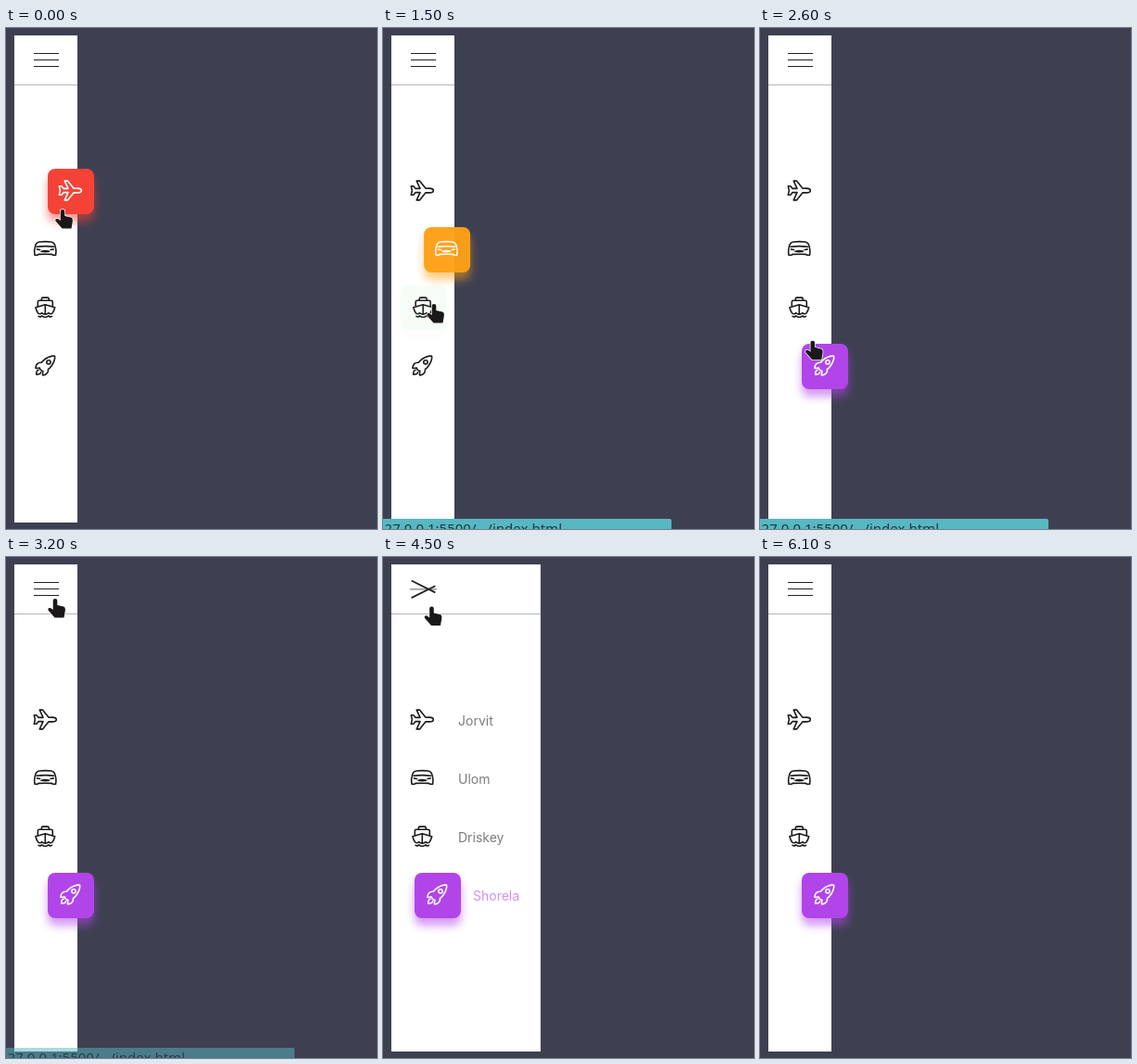
Write an HTML page that moves like this. It is 400 by 541 pixels and loops after 6200 ms.

```html
<!DOCTYPE html>
<html lang="en">
<head>
<meta charset="utf-8">
<title>Sidebar menu</title>
<style>
  html, body { margin: 0; height: 100%; overflow: hidden; background: #3e4052; }
  svg { display: block; width: 100%; height: 100%; }
  .icon { fill: none; stroke-width: 32; stroke-linejoin: round; stroke-linecap: round; }
  .glow { filter: blur(5px); opacity: .55; }
  .label { font: 14px Inter, sans-serif; }
  .status text { font: 15px "Noto Sans", sans-serif; fill: #1d3a42; }
</style>
</head>
<body>
<svg viewBox="0 0 400 541" preserveAspectRatio="none">
  <rect id="panel" x="9" y="8" width="68" height="526" fill="#fff"/>
  <rect id="rule" x="9" y="61" width="68" height="1" fill="#b4b7b8"/>
  <g id="burger" stroke="#222"><path/><path/><path/></g>
  <g id="items"></g>
  <g id="status" class="status">
    <path d="M0 530H309Q311 530 311 532V541H0Z" fill="#57b8c1"/>
    <text x="193" y="546" text-anchor="end">127.0.0.1:5500/…/index.html</text>
  </g>
  <path id="cursor" fill="#1b1819" stroke="#fff" stroke-width="1.4" stroke-linejoin="round" paint-order="stroke"
    d="M-2.3 2Q-2.3 0 0 0T2.3 2V7L9 8.6Q11.3 9.5 10.8 13L9.5 20.5H-.5L-7.5 12.5Q-8.5 9.5 -5 10L-2.3 12Z"/>
</svg>
<script>
const LOOP = 6200, STEP = 100, DURATION = 500;
const $ = id => document.getElementById(id);

const ITEMS = [
  { label: 'Jorvit', color: '#f44336', start: -DURATION, icon:
    `<path d="M408 208L331 210L198 48H135L210 213L113 214L68 160H16L37 254V258L16 352H68L113 297
      L210 299L135 464H198L331 302L408 304C465 304 496 286 496 256C496 226 463 208 408 208Z"/>` },
  { label: 'Ulom', color: '#ffa117', start: 675, icon:
    `<path d="M32 234Q48 118 128 106Q256 92 384 106Q464 118 480 234Q494 300 488 340L480 392H424L400 374
      Q256 366 112 374L88 392H32L24 340Q18 300 32 234ZM72 210Q256 188 440 210M80 264L140 276M432 264L372 276"/>
     <path fill="currentColor" d="M172 312Q256 286 340 312Q256 330 172 312Z"/>` },
  { label: 'Driskey', color: '#0fc70f', start: 1475, icon:
    `<path d="M48 260L256 200L464 260Q440 350 408 388Q360 416 332 380Q256 440 180 380Q152 416 104 388
      Q72 350 48 260ZM256 200V400M96 240V144Q96 112 128 112H384Q416 112 416 144V240
      M176 112V80Q176 48 208 48H304Q336 48 336 80V112M112 452Q150 480 184 444Q256 500 328 444Q362 480 400 452"/>` },
  { label: 'Shorela', color: '#b145e9', start: 2250, duration: 150, icon:
    `<path d="M460 52C400 38 276 86 210 153Q190 172 177 192C100 186 60 220 48 304Q50 316 58 315L139 306
      Q140 330 146 336L177 367Q184 374 207 374L198 455Q200 466 208 465C292 452 326 412 320 336
      Q342 320 360 303C428 234 476 112 462 54ZM110 352Q64 360 64 448Q152 448 160 402"/>
     <circle cx="329" cy="183" r="43"/>` },
];

// Cursor tip: [time, x, y]
const CURSOR = [
  [100, 61, 196], [300, 60, 236], [850, 60, 236], [1200, 57, 299], [1300, 57, 299], [1400, 55, 298],
  [1700, 55, 298], [2100, 57, 355], [2500, 57, 355], [3200, 53, 45], [4400, 53, 45],
  [5000, 46, 159], [5100, 46, 159], [5650, 66, 3],
];

const clamp = v => Math.min(1, Math.max(0, v));
const lerp = (a, b, k) => a + (b - a) * k;
const ramp = (t, start, duration) => clamp((t - start) / duration);
const smooth = k => k * k * (3 - 2 * k);

// The CSS "ease" curve, cubic-bezier(.25, .1, .25, 1)
function ease(x) {
  if (x <= 0 || x >= 1) return clamp(x);
  const bezier = (p1, p2, u) => 3 * u * (1 - u) ** 2 * p1 + 3 * u * u * (1 - u) * p2 + u ** 3;
  let low = 0, high = 1;
  for (let i = 0; i < 24; i++) {
    const mid = (low + high) / 2;
    if (bezier(.25, .25, mid) < x) low = mid; else high = mid;
  }
  return bezier(.1, 1, low);
}

$('items').innerHTML = ITEMS.map(({ label, color, icon }, i) => `
  <g transform="translate(0 ${152 + 63 * i})"><g>
    <g fill="${color}">
      <rect class="glow" x="18" y="8" width="50" height="49" rx="8"/>
      <rect x="18" width="50" height="49" rx="8"/>
    </g>
    <g class="icon" stroke="currentColor" transform="translate(29.5 10.7) scale(.05)">${icon}</g>
    <text class="label" x="81" y="30">${label}</text>
  </g></g>`).join('');

const rows = [...$('items').children].map(row => {
  const body = row.firstElementChild;
  const [box, icon, label] = body.children;
  return { body, box, icon, label };
});

function drawBurger(open) {
  [...$('burger').children].forEach((line, i) => {
    const side = i - 1;
    const y = lerp(34.5 + 7 * side, 35, open);
    const half = lerp(13.5, 15, open);
    line.setAttribute('d', `M${-half} 0H${half}`);
    line.setAttribute('stroke-width', lerp(1, 2.4, open));
    line.setAttribute('transform', `translate(43.5 ${y}) rotate(${-45 * side * open})`);
    line.setAttribute('opacity', side ? 1 : 1 - open);
  });
}

function drawItems(t, open) {
  const selected = ({ start, duration = DURATION }) => ease(ramp(t, start, duration));
  ITEMS.forEach((item, i) => {
    const next = ITEMS[i + 1];
    const active = selected(item) - (next ? selected(next) : 0);
    const { body, box, icon, label } = rows[i];
    const shade = Math.round(lerp(26, 255, active));
    body.setAttribute('transform', `translate(${active * lerp(27, 8.4, open)} 0)`);
    box.setAttribute('opacity', active);
    icon.style.color = `rgb(${shade},${shade},${shade})`;
    label.setAttribute('fill', active > .5 ? item.color : '#222');
    label.setAttribute('opacity', open);
  });
}

function drawCursor(t) {
  const last = CURSOR.length - 1;
  let i = CURSOR.findIndex(([time]) => time > t);
  $('cursor').setAttribute('visibility', i < 0 ? 'hidden' : 'visible');
  if (i < 0) i = last;
  const [t1, x1, y1] = CURSOR[i];
  const [t0, x0, y0] = CURSOR[Math.max(0, i - 1)];
  const k = t1 > t0 ? smooth(ramp(t, t0, t1 - t0)) : 0;
  $('cursor').setAttribute('transform', `translate(${lerp(x0, x1, k)} ${lerp(y0, y1, k)})`);
}

function draw(t) {
  const open = ease(ramp(t, 3425, DURATION)) - ease(ramp(t, 4400 - 25, DURATION));
  const width = lerp(68, 225, open);
  $('panel').setAttribute('width', width);
  $('rule').setAttribute('width', width);
  drawBurger(open);
  drawItems(t, open);
  drawCursor(t);
  const status = ramp(t, 150, 150) - ramp(t, 3100, 200) + ramp(t, 5050, 150) - ramp(t, 5800, 300);
  $('status').setAttribute('opacity', clamp(status));
}

function tick(now) {
  draw(Math.floor(now % LOOP / STEP) * STEP);
  requestAnimationFrame(tick);
}
draw(0);
requestAnimationFrame(tick);
</script>
</body>
</html>
```
